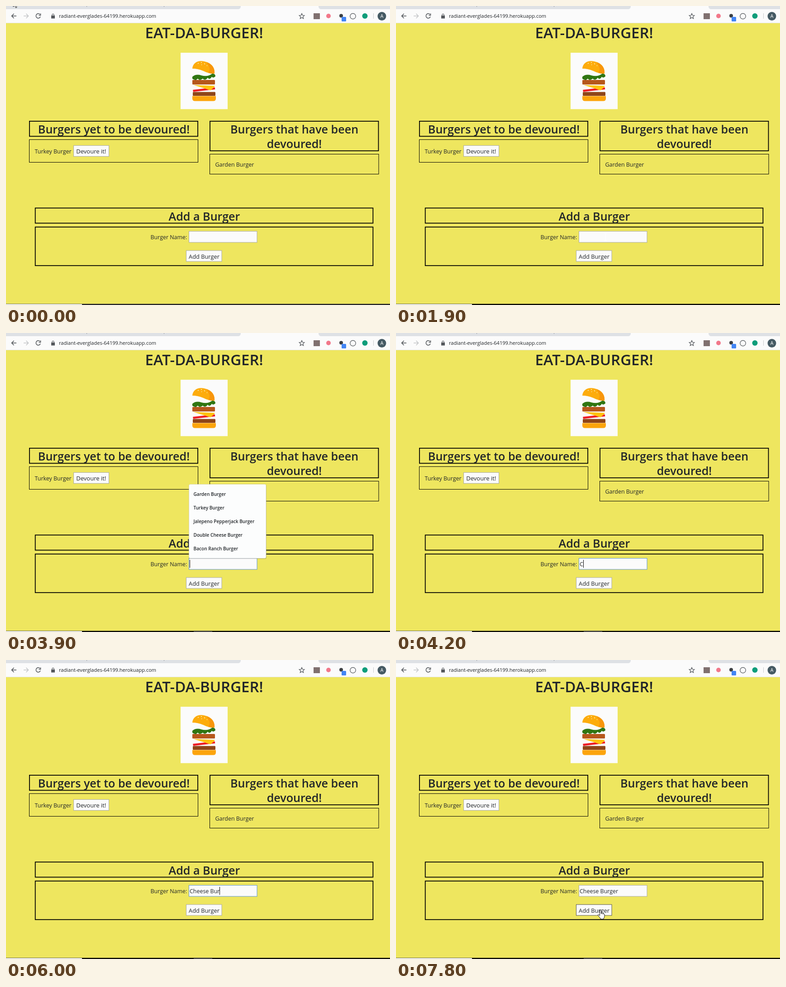
An HTML page that plays this animation: 849x659 px, repeating every 8 s.

```html
<!DOCTYPE html>
<html lang="en">
<head>
<meta charset="utf-8">
<title>Eat-da-burger</title>
<style>
  html, body { margin: 0; width: 100%; height: 100%; overflow: hidden; background: #eee65f; }
  svg { display: block; width: 100%; height: 100%; font: 12.45px "Open Sans", "Noto Sans", sans-serif; fill: #212529; }
  text { white-space: pre; }
  .mid { text-anchor: middle; }
  .h1 { font-size: 32.9px; font-weight: 600; }
  .h2 { font-size: 25.1px; font-weight: 600; }
  .box { fill: none; stroke: #000; }
  .thick { stroke-width: 1.8; }
  .field { fill: #fbfbfb; stroke: #a9a9a5; }
  .icon { fill: none; stroke: #4d5156; stroke-width: 1.5; }
  .menu { font-size: 10.1px; font-weight: 600; }
  .pointer { fill: #fff; stroke: #000; stroke-width: .9; }
</style>
</head>
<body>
<svg viewBox="0 0 849 659" preserveAspectRatio="none">
  <rect width="849" height="659" fill="#eee65f"/>

  <!-- browser bar -->
  <rect width="849" height="38" fill="#fbfbfb"/>
  <path d="M0 0H519V2Q518 7 513 7H0zM691 0H849V7H697Q692 7 691 2z" fill="#dee1e5"/>
  <path d="M178.500 0v2M349.500 0v2" stroke="#9a9da1"/>
  <path d="M0 37.500H849" stroke="#e6e5d2"/>
  <path class="icon" d="M23 22H12.500M17.500 17l-5 5 5 5M75 18.500a5 5 0 1 0 1 5M76.500 16.500v4h-4"/>
  <path class="icon" d="M39 22h10.500M44.500 17l5 5-5 5" style="stroke:#c3c5c8"/>
  <path d="M100 21h8v6.500h-8z" fill="#55585c"/>
  <path class="icon" d="M102 21v-1.500a2 2 0 0 1 4 0V21" style="stroke-width:1.200"/>
  <text x="117" y="26.300" font-size="11.050">radiant-everglades-64199.herokuapp.com</text>
  <path class="icon" style="stroke-width:1.200" d="M654 16.500l1.600 4 4.200.3-3.200 2.800 1 4.200-3.600-2.300-3.600 2.300 1-4.200-3.200-2.800 4.200-.3z"/>
  <rect x="680" y="16" width="14" height="13" fill="#80706f"/>
  <circle cx="713" cy="22" r="5" fill="#f2788a"/>
  <circle cx="741" cy="21.500" r="4" fill="#3b3f43"/>
  <rect x="742" y="24" width="10" height="10" rx="1.500" fill="#4285f4"/>
  <circle class="icon" cx="767" cy="22.500" r="6.200" style="stroke-width:1.200"/>
  <circle cx="793.500" cy="22" r="6" fill="#0f9d7a"/>
  <path d="M812.500 16v12" stroke="#c8cacd"/>
  <circle cx="831" cy="22.500" r="9.500" fill="#455a64"/>
  <text class="mid" x="831" y="26.300" font-size="10.500" style="fill:#fff">A</text>

  <!-- page -->
  <text class="mid h1" x="438" y="71">EAT-DA-BURGER!</text>
  <rect x="386" y="103" width="104" height="124.300" fill="#fbfbfb"/>
  <g id="burger">
    <path d="M412 138C413 124 426 119 438 122C453 125 462 134 461 149Q450 150 436 143Q424 138 412 138z" fill="#fdac0c"/>
    <path d="M443 124C456 128 462 137 461 149Q455 150 447 147Q455 138 443 124z" fill="#f8960b"/>
    <path d="M424 127l2-1M431 124l2 1M438 127l2 1M432 130l1-1M444 131l1 1" stroke="#fff0bd" stroke-width="1.500"/>
    <path d="M412 156Q420 149 432 153Q446 157 456 149Q463 149 463 155Q458 160 455 156Q450 164 446 158Q440 166 435 160Q428 166 424 160Q418 166 416 162Q411 162 412 156z" fill="#2f7512"/>
    <rect x="412" y="163" width="50" height="10" rx="1.500" fill="#b6571c"/>
    <path d="M413.500 187L462 181.500" stroke="#ee1c25" stroke-width="4.500"/>
    <path d="M414 174L462 176L459 180L452 186L434 180z" fill="#ffc20f"/>
    <rect x="413" y="189.500" width="50" height="8.500" rx="1.500" fill="#8f4519"/>
    <path d="M412 198.500H464V204Q464 209.500 458 209.500H418Q412 209.500 412 204z" fill="#fca40c"/>
  </g>

  <rect class="box thick" x="51.900" y="253.900" width="372.200" height="33.300"/>
  <text class="mid h2" x="238.500" y="281">Burgers yet to be devoured!</text>
  <rect class="box" x="51.500" y="294.500" width="373" height="50"/>
  <text x="63.500" y="325">Turkey Burger</text>
  <rect class="field" x="149.500" y="307.500" width="78" height="24"/>
  <text class="mid" x="188.300" y="325" font-size="13">Devoure it!</text>

  <rect class="box thick" x="451" y="253.900" width="372.500" height="65.300"/>
  <text class="mid h2" x="637.500" y="281">Burgers that have been</text>
  <text class="mid h2" x="637.500" y="313">devoured!</text>
  <rect class="box" x="450.500" y="326.500" width="373.500" height="44"/>
  <text x="462.500" y="354">Garden Burger</text>

  <rect class="box thick" x="64.700" y="445.300" width="746.700" height="33.300"/>
  <text class="mid h2" x="438.500" y="473">Add a Burger</text>
  <rect class="box thick" x="64.700" y="487.200" width="746.700" height="85"/>
  <text x="319.500" y="514">Burger Name:</text>
  <rect class="field" id="input" x="404.500" y="496.500" width="150.500" height="24.500"/>
  <text id="typed" x="406" y="514"></text>
  <path id="caret" d="M.5 500V517.500" stroke="#000"/>
  <rect class="field" id="add" x="398.500" y="539" width="78.500" height="24"/>
  <text class="mid" x="438" y="556.500" font-size="12.800">Add Burger</text>

  <g id="menu" class="menu">
    <rect x="404" y="334" width="172" height="164" rx="3.500" fill="#000" opacity=".18"/>
    <rect x="404.500" y="333.500" width="170.500" height="163" rx="3" fill="#fcfdfd" stroke="#d2d2c4" stroke-width=".6"/>
  </g>

  <!-- taskbar -->
  <rect id="bar" y="656.500" width="849" height="2.500"/>
  <rect y="657" width="168" height="2" fill="#f4f4f4"/>
  <rect id="task" x="415" y="656.500" width="41" height="2.500" fill="#4a4a4a"/>

  <path id="arrow" class="pointer" d="M0 0V14.500L3.300 11.500L5.600 17L8 16L5.700 10.700H10.300z"/>
  <path id="beam" fill="none" stroke="#fff" d="M-3-8H-1L0-7 1-8H3M0-7V7M-3 8H-1L0 7 1 8H3"/>
  <path id="hand" class="pointer" d="M-1.500 1.200a1.500 1.500 0 0 1 3 0V8q1.400-.9 2.700.2q1.400-.7 2.600.5q2-.3 2.200 1.400v4q-.4 3-2 4.600V20H0v-1.600Q-3 15-5.500 11.500q0-2.200 2-1.200l2 2z"/>
</svg>
<script>
const LOOP = 8000, NAME = "Cheese Burger";
const KEYS = [4200, 4400, 4500, 4600, 4900, 5000, 5100, 5600, 5900, 6000, 6200, 6300, 6400];
// pointer stops: time, x, y
const STOPS = [
  [400, 16, -13], [900, 445, 435], [1100, 445, 435], [1600, 460, 517], [1700, 460, 517],
  [1900, 463, 509], [6700, 463, 509], [7200, 452, 551], [LOOP, 452, 551]
];
const $ = id => document.getElementById(id);
const show = (id, on) => $(id).style.display = on ? "" : "none";

["Garden", "Turkey", "Jalepeno Pepperjack", "Double Cheese", "Bacon Ranch"].forEach((name, i) => {
  const item = document.createElementNS("http://www.w3.org/2000/svg", "text");
  item.setAttribute("x", 414.5);
  item.setAttribute("y", 358.5 + 30 * i);
  item.textContent = name + " Burger";
  $("menu").append(item);
});

function pointerAt(t) {
  const i = Math.max(1, STOPS.findIndex(s => s[0] >= t));
  const [t0, x0, y0] = STOPS[i - 1], [t1, x1, y1] = STOPS[i];
  const k = Math.max(0, (t - t0) / (t1 - t0));
  return [x0 + (x1 - x0) * k, y0 + (y1 - y0) * k];
}

function movePointer(t) {
  const [x, y] = pointerAt(t);
  const kind = y > 537 ? "hand" : y > 495 && y < 520 ? "beam" : "arrow";
  for (const id of ["arrow", "beam", "hand"]) show(id, id === kind);
  show(kind, kind !== "beam" || t < 3800 || t >= 6800);
  $(kind).setAttribute("transform", `translate(${x} ${y})`);
}

function draw(now) {
  const t = Math.floor(now % LOOP / 100) * 100;
  const focus = t >= 3800 && t < 7600;

  $("typed").textContent = NAME.slice(0, KEYS.filter(k => k <= t).length);
  const end = Math.round(406 + $("typed").getComputedTextLength());
  $("caret").setAttribute("transform", `translate(${end} 0)`);
  show("caret", focus && !(t >= 6900 && t < 7400));

  $("input").style.stroke = focus ? "#5b93d6" : "";
  $("add").style.stroke = t >= 7000 ? "#55554e" : "";
  $("add").style.fill = t >= 7600 && t < 7800 ? "#f0f0f0" : "";

  show("menu", t >= 3800 && t < 4200);
  $("menu").style.opacity = t < 3900 ? .5 : 1;
  show("task", t >= 3800);
  $("bar").style.fill = t < 500 ? "#22232a" : "#050505";

  movePointer(t);
  requestAnimationFrame(draw);
}
requestAnimationFrame(draw);
</script>
</body>
</html>
```
